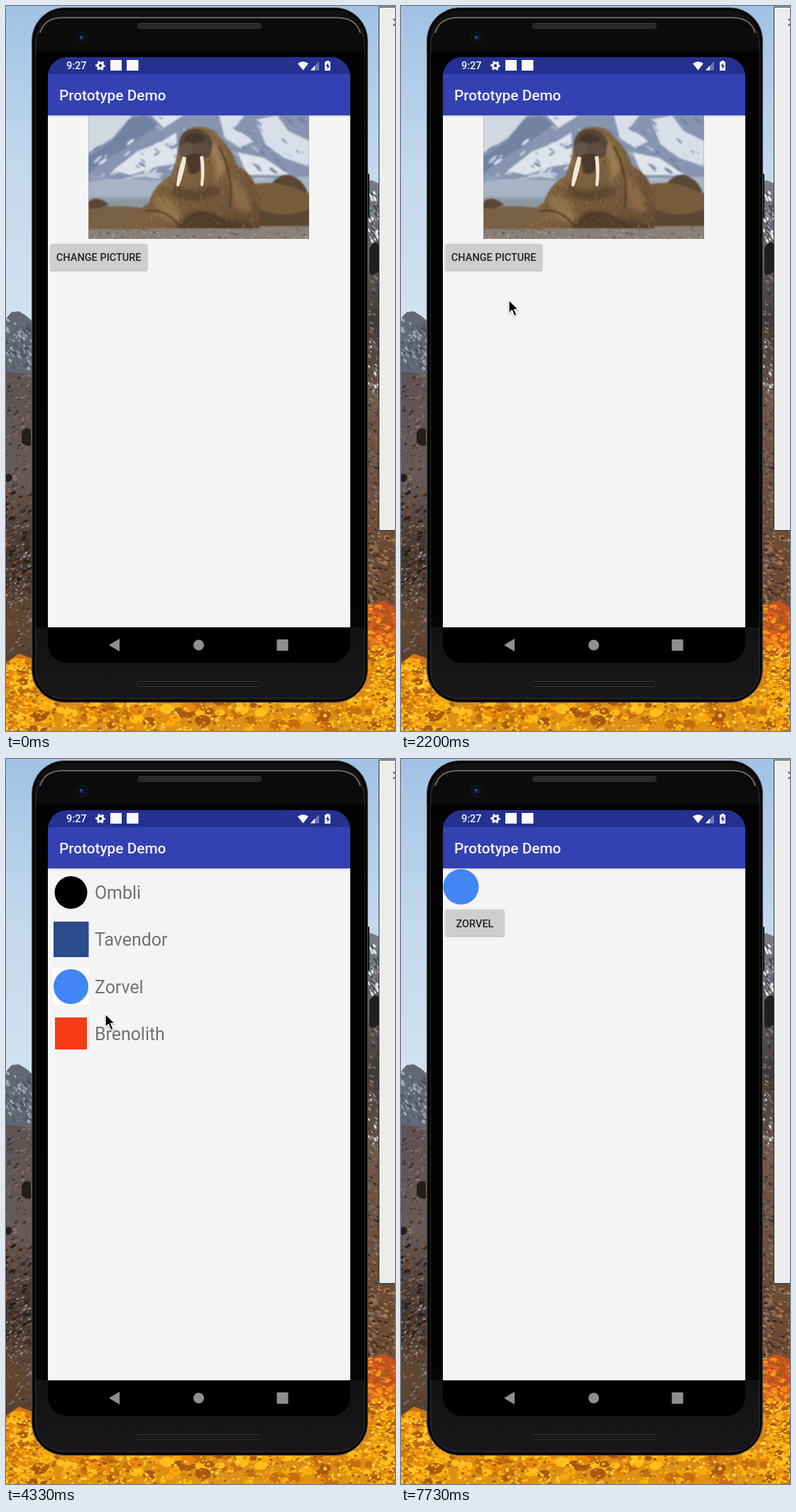
An HTML page for the animation above (7790 ms loop, 548 by 1021 pixels).

```html
<!DOCTYPE html>
<html lang="en">
<head>
<meta charset="utf-8">
<title>Picture picker</title>
<style>
  html, body { margin: 0; width: 548px; height: 1021px; overflow: hidden; background: #c5d8ea; }
  svg { position: absolute; left: 0; top: 0; font-family: Roboto, sans-serif; }
  #backdrop { will-change: transform; }
  .title { font-size: 20.8px; font-weight: 500; fill: #f4f4f8; }
  .button { font-size: 14.5px; font-weight: 500; fill: #222; }
  .row { font-size: 24.9px; fill: #727272; }
</style>
</head>
<body>
<svg id="backdrop" width="548" height="1021">
  <defs>
    <linearGradient id="sky" x2="0" y2="1">
      <stop stop-color="#a2c2e5"/><stop offset=".5" stop-color="#c2d8ec"/><stop offset="1" stop-color="#d2e2ef"/>
    </linearGradient>
    <linearGradient id="slope" x2="0" y2="1">
      <stop stop-color="#5d5355"/><stop offset=".3" stop-color="#685957"/>
      <stop offset=".5" stop-color="#45362f"/><stop offset=".7" stop-color="#634831"/>
      <stop offset="1" stop-color="#3b302e"/>
    </linearGradient>
    <linearGradient id="ridge" x2="0" y2="1">
      <stop stop-color="#777d88"/><stop offset=".15" stop-color="#5c5a5b"/>
      <stop offset=".25" stop-color="#3f3a37"/><stop offset=".4" stop-color="#715746"/>
      <stop offset=".7" stop-color="#6b4a33"/><stop offset="1" stop-color="#805a3c"/>
    </linearGradient>
    <linearGradient id="leaves" gradientUnits="userSpaceOnUse" x1="0" y1="846" x2="0" y2="1021">
      <stop stop-color="#c9501f"/><stop offset=".45" stop-color="#d27a16"/><stop offset="1" stop-color="#dd9416"/>
    </linearGradient>
    <linearGradient id="body" x2="0" y2="1">
      <stop stop-color="#0b0b0b"/><stop offset=".8" stop-color="#0e0e0e"/><stop offset="1" stop-color="#171717"/>
    </linearGradient>
  </defs>
  <rect width="548" height="450" fill="url(#sky)"/>
  <path d="M0 440L8 431 18 430 28 436 40 446V530H0z" fill="#626975"/>
  <path d="M0 515L40 519V1021H0z" fill="url(#slope)"/>
  <path d="M505 252L514 245 526 250 548 262V1021H505z" fill="url(#ridge)"/>
  <g id="texture"></g>
  <path d="M22 600q6-9 13-3v22q-8 2-13-5zM0 660q6-4 9 4-3 9-9 5zM512 340q9-12 13-4v38q-10 8-13 2z" fill="#211e1c"/>
  <path d="M0 925L18 912 40 920H505V846L532 838 548 846V1021H0z" fill="url(#leaves)"/>
  <g id="foliage"></g>
  <path d="M525.500 1.500H550V738.500H525.500z" fill="#ececec" stroke="#333"/>
  <path d="M545.500 18l10 10m0-10l-10 10" stroke="#444" stroke-width="1.500"/>
  <rect x="508" y="236" width="4" height="62" rx="1.500" fill="#151515"/>
  <rect x="36.500" y="2.500" width="473" height="978" rx="46" fill="#202121" stroke="#484949"/>
  <rect x="39" y="4.500" width="468" height="974" rx="44" fill="#111" stroke="#050505" stroke-width="3"/>
  <rect x="42" y="16" width="463" height="959" rx="38" fill="url(#body)" stroke="#343535"/>
  <path d="M48 38Q54 17 78 16.500H468Q493 17 499 38" fill="none" stroke="#777" stroke-width="1.500"/>
  <path d="M42 64H505V875H42z" fill="#000" opacity=".75"/>
  <g fill="#242424" stroke="#3c3c3c">
    <rect x="185.500" y="24.500" width="174" height="7" rx="3"/>
    <rect x="184.500" y="951.500" width="174" height="7" rx="3" fill="#0b0b0b"/>
  </g>
  <path d="M189 28H357M188 955H356" stroke="#333" stroke-width="3" stroke-dasharray="1 1"/>
  <circle cx="107" cy="45" r="8" fill="#080a12" stroke="#222"/>
  <circle cx="107" cy="45" r="4" fill="#151c48"/><circle cx="105.500" cy="44" r="1.500" fill="#4656b0"/>
</svg>

<svg width="548" height="1021">
  <defs>
    <clipPath id="glass"><rect x="59" y="72" width="426" height="853" rx="27"/></clipPath>
    <clipPath id="reveal"><rect id="revealBox" x="59" y="72" width="426" height="853"/></clipPath>
    <clipPath id="photoBox"><path d="M116 154H427V328H116z"/></clipPath>
    <path id="walrus" d="M245 190Q249 170 272 170 292 171 300 184 319 202 325 224 355 240 357 276V313H168Q180 292 202 276 207 253 232 239 241 218 245 190z"/>
    <clipPath id="walrusBox"><use href="#walrus"/></clipPath>
    <filter id="soft"><feGaussianBlur stdDeviation=".8"/></filter>
    <filter id="softer"><feGaussianBlur stdDeviation="3"/></filter>
    <filter id="lift"><feDropShadow dx="0" dy="1" stdDeviation="1" flood-opacity=".35"/></filter>
    <linearGradient id="edge" x2="0" y2="1">
      <stop stop-opacity=".16"/><stop offset="1" stop-opacity="0"/>
    </linearGradient>
    <linearGradient id="fur" x2="1" y2="1">
      <stop stop-color="#856b49"/><stop offset=".5" stop-color="#7e613f"/><stop offset="1" stop-color="#634b32"/>
    </linearGradient>
    <g id="window">
      <path d="M59 72H485V925H59z"/>
      <path d="M59 72H485V97H59z" fill="#263091"/>
      <path d="M59 96H485V154H59z" fill="#3341b3"/>
      <path d="M59 154H485V875H59z" fill="#f4f4f4"/>
      <path d="M59 154H485V157H59z" fill="url(#edge)"/>
      <text class="title" x="75" y="133">Prototype Demo</text>
    </g>
  </defs>
  <g clip-path="url(#glass)">
    <path d="M59 72H485V925H59z"/>
    <g id="home">
      <use href="#window"/>
      <g id="before">
        <g clip-path="url(#photoBox)">
          <path d="M116 154H427V328H116z" fill="#8795b1"/>
          <g filter="url(#soft)">
            <path d="M116 154H178L150 186 116 207z" fill="#d3d9e2"/>
            <path d="M172 160L196 154 214 166 176 196 140 216 116 236V213L150 190z" fill="#7282a2"/>
            <path d="M240 178L214 194 186 204 150 232 176 238 214 226 242 222zM205 154H250L222 172z" fill="#dfe4ec"/>
            <path d="M300 154H336L322 172 350 190 330 200 308 186zM352 160L382 154 398 176 427 190V226L392 214 366 196z" fill="#d9dfe9"/>
            <path d="M326 206L364 214 400 238H340z" fill="#e0e5ec"/>
          </g>
          <g id="snow" filter="url(#soft)"></g>
          <path d="M116 247Q180 240 250 249L427 240V300H116z" fill="#a7b4c5" filter="url(#soft)"/>
          <path d="M116 270H427V300H116z" fill="#8c969f" filter="url(#softer)"/>
          <path d="M116 312Q260 302 427 308V328H116z" fill="#8b8078"/>
          <g filter="url(#soft)">
            <path d="M116 285Q160 278 207 287L195 314H116z" fill="#776044"/>
            <path d="M116 276Q128 265 145 280L130 285H116z" fill="#584637"/>
            <path d="M374 250Q386 236 399 238 416 243 423 258L427 270H374z" fill="#594633"/>
            <path d="M345 252Q375 245 400 254 418 262 430 264V309H350z" fill="#765c3e"/>
            <path d="M350 283Q390 302 427 286V310H350z" fill="#5a4632"/>
            <use href="#walrus" fill="url(#fur)"/>
          </g>
          <g clip-path="url(#walrusBox)">
            <g filter="url(#softer)">
              <path d="M280 180Q306 198 309 230L293 252Q302 218 277 196z" fill="#9b7d55"/>
              <path d="M238 250Q259 268 290 252L305 262Q264 287 230 263z" fill="#5c462f"/>
              <path d="M207 270Q235 261 250 304L220 302z" fill="#92744c"/>
              <path d="M245 305Q265 277 300 298L345 306 357 314H240z" fill="#503e2c"/>
              <path d="M313 238Q345 254 344 292L323 284z" fill="#8a6b45"/>
            </g>
            <g id="hair" opacity=".4"></g>
            <path d="M196 289Q222 282 246 311M250 309Q262 289 282 292 303 297 318 311M300 198Q322 240 315 284" fill="none" stroke="#493724" stroke-width="2" filter="url(#soft)"/>
          </g>
          <g filter="url(#soft)">
            <path d="M244 192Q248 172 270 173 288 177 291 193L288 211Q270 219 246 211z" fill="#574638"/>
            <path d="M252 184Q264 174 280 185L276 195H253z" fill="#45382f"/>
            <ellipse cx="256" cy="202" rx="12" ry="10" fill="#665448"/>
            <ellipse cx="274" cy="202" rx="12" ry="10" fill="#5e4c40"/>
            <path d="M253 211Q265 205 278 211L272 234Q262 240 257 233z" fill="#4b3829"/>
          </g>
          <path d="M249 212Q242 233 240 252 241 256 244 253 252 232 254 213zM273 212Q276 233 274 252 276 256 278 252 281 231 278 211z" fill="#f1e8da"/>
          <g id="gravel"></g>
        </g>
        <rect x="62.500" y="335" width="136.500" height="37" rx="2" fill="#cecece" filter="url(#lift)"/>
        <text class="button" x="130.700" y="359" text-anchor="middle">CHANGE PICTURE</text>
      </g>
      <g id="after">
        <circle cx="84.500" cy="180" r="25" fill="#4285f4"/>
        <rect x="62.500" y="212" width="83" height="37" rx="2" fill="#cecece" filter="url(#lift)"/>
        <text class="button" x="104" y="236.500" text-anchor="middle">ZORVEL</text>
      </g>
    </g>
    <path id="dim" d="M59 72H485V925H59z"/>
    <g id="list" clip-path="url(#reveal)">
      <use href="#window"/>
      <circle cx="91.500" cy="188" r="23"/>
      <path d="M67 229H116.500V279H67z" fill="#2c4a8c"/>
      <path d="M66 295H117V346H66z" fill="#fff"/>
      <circle cx="91.500" cy="320.500" r="24.500" fill="#4285f4"/>
      <path d="M69 364H114V409H69z" fill="#f53b18"/>
      <g class="row">
        <text x="125" y="197">Ombli</text>
        <text x="125" y="263.300">Tavendor</text>
        <text x="125" y="329.600">Zorvel</text>
        <text x="125" y="396">Brenolith</text>
      </g>
    </g>
    <g fill="#fafafa">
      <text x="85" y="89" font-size="14.500" font-weight="500">9:27</text>
      <circle cx="133" cy="84" r="3.700" fill="none" stroke="#fafafa" stroke-width="3"/>
      <circle cx="133" cy="84" r="5.800" fill="none" stroke="#fafafa" stroke-width="2.200" stroke-dasharray="3 3.070" stroke-dashoffset="1.500"/>
      <path d="M147 76h16v15h-16zM170 76h16.500v15H170z"/>
      <path d="M411 81Q418.500 75.500 426 81L418.500 90.500z"/>
      <path d="M429 90.500L441 78V90.500z" opacity=".35"/><path d="M429 90.500L435 84V90.500z"/>
      <path d="M451.500 77h3.500v1.500h2V91H449V78.500h2.500z"/>
      <path d="M454 80l-3.500 5h2.200v4l3.300-5h-2z" fill="#263091"/>
    </g>
    <g fill="#fff" opacity=".56">
      <path d="M145 900L160 891V909z"/><circle cx="271.500" cy="900" r="7.500"/>
      <rect x="381.500" y="892" width="16" height="16" rx="1"/>
    </g>
  </g>
  <path id="cursor" d="M0 0V18.500L4.300 14.600 7.600 22.500 11 21 7.700 13.300H13.300z" stroke="#fff" stroke-width="1.300" filter="url(#lift)"/>
</svg>

<script>
const LOOP = 7790, OPEN = 3803, CLOSE = 5740, SLIDE = 425, HEIGHT = 853;
const el = id => document.getElementById(id);
const clamp = v => Math.max(0, Math.min(1, v));

let seed = 7;
const random = () => (seed = seed * 16807 % 2147483647) / 2147483647;

// Random flecks in a box, as SVG markup.
function flecks(x, y, w, h, count, colors, size, tilt = 0, stretch = 1.4) {
  let out = '';
  for (let i = 0; i < count; i++) {
    const px = (x + random() * w).toFixed(1), py = (y + random() * h).toFixed(1);
    const r = size * (.4 + random()), color = colors[random() * colors.length | 0];
    out += `<ellipse cx="${px}" cy="${py}" rx="${(r * stretch).toFixed(1)}" ry="${r.toFixed(1)}"
      fill="${color}" transform="rotate(${tilt + random() * 20 - 10} ${px} ${py})"/>`;
  }
  return out;
}

const rock = ['#3b3231', '#75665f', '#594a43', '#8b7767'];
const gold = ['#ffc21f', '#f5a30b', '#e78a0c', '#ffd241', '#a86412', '#f9b318'];
const clumps = ['#c46f0e', '#f7a90c', '#e8860b', '#ffbe1c', '#a9590f'];
const rust = ['#e45a28', '#ee8618', '#c94a21', '#f6a016', '#a05a1c'];

el('texture').innerHTML =
  flecks(0, 442, 36, 68, 110, ['#484f5c', '#7f8794', '#59606b', '#a3abb5'], 1.6, 50, 2) +
  flecks(0, 520, 36, 390, 420, rock, 1.1, -25, 2) +
  flecks(0, 680, 36, 150, 90, ['#2a201d', '#705039', '#3f2e28'], 1.8, -25, 2) +
  flecks(0, 770, 36, 75, 45, ['#9b9390', '#37302f'], 1, -40, 2) +
  flecks(510, 258, 15, 75, 65, ['#e1e5ea', '#8e96a2', '#454950'], 1.3, 60, 2) +
  flecks(510, 375, 16, 465, 260, rock, 1.2, 30, 2) +
  flecks(510, 470, 15, 75, 22, ['#d8d6d5', '#8c8582'], 1.2, 60, 2) +
  flecks(510, 740, 38, 100, 150, ['#533a2b', '#916747', '#a87850', '#3e2d24'], 1.3, 20, 2);
el('foliage').innerHTML =
  flecks(0, 925, 36, 96, 45, clumps, 6) +
  flecks(36, 965, 474, 56, 170, clumps, 6) +
  flecks(510, 915, 38, 106, 45, clumps, 6) +
  flecks(0, 920, 38, 101, 330, gold, 1.5) +
  flecks(36, 960, 474, 61, 900, gold, 1.5) +
  flecks(510, 845, 38, 70, 230, rust, 2) +
  flecks(510, 905, 38, 116, 330, gold, 1.5);
el('snow').innerHTML =
  flecks(180, 156, 247, 84, 60, ['#71819f', '#8191ad', '#a9b5c9'], 1.6, 35, 3.5) +
  flecks(116, 190, 130, 50, 26, ['#dfe4ec', '#c3ccda', '#7c8ba8'], 1.6, -35, 3.5) +
  flecks(116, 236, 311, 14, 24, ['#c9d2de', '#90a0b8'], 2, 0, 6);
el('hair').innerHTML = flecks(165, 175, 195, 138, 420, ['#a58860', '#4f3c28', '#8e7049', '#654d32'], 1, 70, 3);
el('gravel').innerHTML = flecks(116, 313, 311, 15, 130, ['#6d645e', '#a3978b', '#7d726a'], 1.2);

// Easing through cubic segments given as [x0,y0, x1,y1, x2,y2, x3,y3].
const cubic = (a, b, c, d, t) => ((1 - t) ** 3) * a + 3 * t * (1 - t) * ((1 - t) * b + t * c) + t ** 3 * d;
function along([x0, y0, x1, y1, x2, y2, x3, y3], x) {
  let lo = 0, hi = 1;
  for (let i = 0; i < 24; i++) {
    const mid = (lo + hi) / 2;
    if (cubic(x0, x1, x2, x3, mid) < x) lo = mid; else hi = mid;
  }
  return cubic(y0, y1, y2, y3, lo);
}
const slideEase = x => along([0, 0, .4, 0, .2, 1, 1, 1], x);
const clipEase = x => x < 1 / 6
  ? along([0, 0, .05, 0, .1333, .06, 1 / 6, .4], x)
  : along([1 / 6, .4, .2083, .82, .25, 1, 1, 1], x);

// Pointer stops: time, x, y.
const stops = [
  [1450, 560, 330], [1980, 152, 414], [2650, 152, 414], [3250, 140, 359],
  [4500, 140, 359], [5150, 160, 314], [6750, 160, 314], [7250, 104, 153], [7700, 512, 46]
];

function drawCursor(t) {
  const next = stops.findIndex(s => s[0] > t);
  el('cursor').style.display = next > 0 ? '' : 'none';
  if (next < 1) return;
  const [t0, x0, y0] = stops[next - 1], [t1, x1, y1] = stops[next];
  const p = (t - t0) / (t1 - t0), k = p * p * (3 - 2 * p);
  el('cursor').setAttribute('transform', `translate(${x0 + (x1 - x0) * k} ${y0 + (y1 - y0) * k})`);
}

const shift = (id, dy) => el(id).setAttribute('transform', `translate(0 ${Math.round(dy)})`);

function draw(t) {
  const closing = t >= CLOSE;
  const p = clamp((t - (closing ? CLOSE : OPEN)) / SLIDE);
  const slid = closing ? 1 - slideEase(p) : slideEase(p);
  const shown = closing ? 1 - clipEase(p) : clipEase(p);
  const dim = closing ? 1 - clamp((t - CLOSE - 66) / 50) : clamp((t - OPEN) / 117);

  shift('home', -.02 * HEIGHT * slid);
  shift('list', .041 * HEIGHT * (1 - slid));
  el('dim').setAttribute('opacity', .1 * dim);
  el('revealBox').setAttribute('y', Math.round(72 + .959 * HEIGHT * (1 - shown)));
  el('list').style.display = t > OPEN && t < CLOSE + SLIDE ? '' : 'none';
  el('before').style.display = closing ? 'none' : '';
  el('after').style.display = closing ? '' : 'none';
  drawCursor(t);
}

const start = performance.now();
function tick() {
  draw((performance.now() - start) % LOOP);
  requestAnimationFrame(tick);
}
tick();
</script>
</body>
</html>
```
